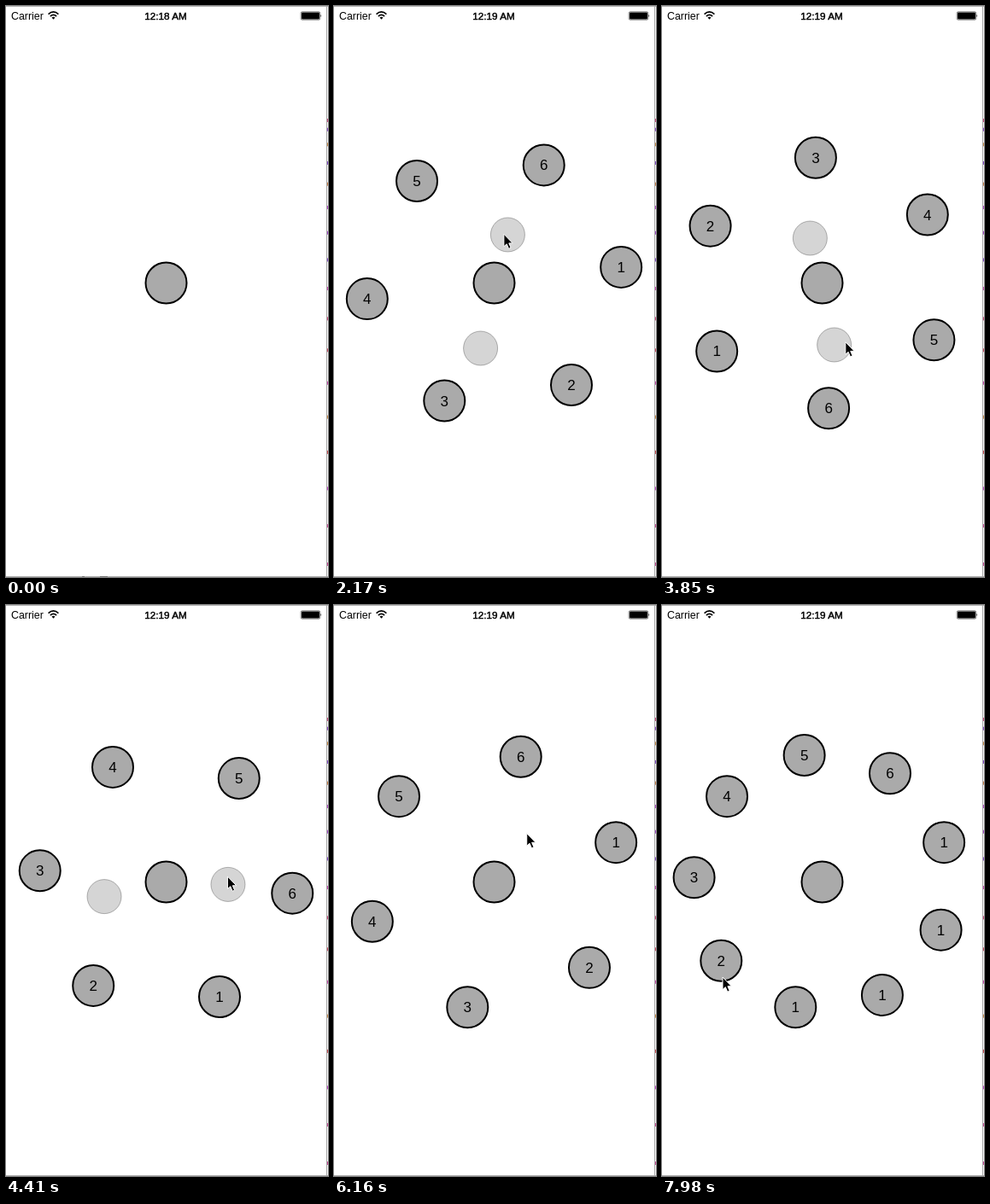
Animation of 377 by 669 pixels, one loop 8 s. Source, as an HTML page:

```html
<!DOCTYPE html>
<html lang="en">
<head>
<meta charset="utf-8">
<title>Radial menu</title>
<style>
  html, body { margin: 0; width: 100%; height: 100%; overflow: hidden; background: #fff; }
  svg { display: block; width: 377px; height: 669px; }
  text { font-family: "Liberation Sans", Arial, sans-serif; }
  .cell circle { fill: #aaa; stroke: #000; stroke-width: 2; }
  .cell text { font-size: 17px; text-anchor: middle; }
  .touch { fill: rgba(128, 128, 128, .33); stroke: rgba(90, 90, 90, .45); }
  #clock { font-size: 11.7px; text-anchor: middle; stroke: #000; stroke-width: .45; }
</style>
</head>
<body>
<svg viewBox="0 0 377 669">
  <rect width="377" height="669" fill="#fff"/>
  <g id="edge">
    <rect width="377" height="1" fill="#b4b4b4"/>
    <rect y="668" width="377" height="1" fill="#b0b0b0"/>
    <rect x="375" width="1" height="669" fill="#a6a6a6"/>
  </g>
  <g id="marks" fill="#777">
    <rect x="89" y="668" width="3" height="1"/>
    <rect x="110" y="668" width="9" height="1"/>
  </g>

  <text x="6" y="15.8" font-size="12.4">Carrier</text>
  <g fill="none" stroke="#000" stroke-width="1.7">
    <path d="M49.6 9.6Q55.5 4.2 61.4 9.6"/>
    <path d="M51.9 12Q55.5 8.8 59.1 12"/>
  </g>
  <path d="M53.5 13.5Q55.5 11.9 57.5 13.5L55.5 15.7Z"/>
  <text id="clock" x="187" y="15.6"></text>
  <rect x="345.2" y="6.8" width="22.6" height="9.4" rx="1.6" fill="none" stroke="#000" stroke-width=".5"/>
  <rect x="346" y="7.6" width="21" height="7.8" rx=".8"/>
  <path d="M368.4 9.8Q370 11.5 368.4 13.2Z"/>

  <g class="cell" transform="translate(187.5 324.5)"><circle r="24"/></g>
  <g id="ring"></g>
  <circle id="touchA" class="touch" r="20"/>
  <circle id="touchB" class="touch" r="20"/>
  <path id="cursor" d="M0 0V14.6L3.3 11.6L5.7 17.2L8.2 16.1L5.9 10.7H10.3Z" stroke="#fff" stroke-linejoin="round"/>
</svg>

<script>
const NS = 'http://www.w3.org/2000/svg';
const LOOP = 8000;
const HUB = [187.5, 324.5], MID = [187.5, 334.5], R = 150;
const OPEN = 800, MOVE = 300;
const INSERTS = [0, 1, 2].map(k => 6406 + 345 * k);
const TOUCH = [1610, 5510], LAG = 70;

// Key points of the drag: time, ring angle, finger angle, finger radius
const DRAG = [
  [1880, 0, -67, 68],
  [2170, -7.1, -76.5, 68.4],
  [3220, -117.1, -182.5, 58],
  [4410, -294.8, -365.5, 72.8],
  [5180, -367.5, -427, 83],
  [5510, -378, -437, 83],
];
// Pointer moves outside the drag: start, duration, end position
const MOVES = [
  [100, 320, [199, 304]],
  [1050, 350, [214, 272]],
  [5510, 1, [206, 253]],
  [5520, 430, [232, 268]],
  [6120, 260, [138, 262]],
  [7450, 300, [71, 318]],
  [7790, 180, [71, 436]],
];

const $ = id => document.getElementById(id);
const rad = deg => deg * Math.PI / 180;
const ease = x => { x = Math.min(1, Math.max(0, x)); return x * x * (3 - 2 * x); };
const mix = (a, b, f) => a.map((v, i) => v + (b[i] - v) * f);
const polar = (o, deg, r) => [o[0] + r * Math.cos(rad(deg)), o[1] + r * Math.sin(rad(deg))];
const place = (el, p) => el.setAttribute('transform', `translate(${p[0].toFixed(2)} ${p[1].toFixed(2)})`);
const show = (el, on) => el.style.display = on ? '' : 'none';

function add(parent, tag, attrs) {
  const el = document.createElementNS(NS, tag);
  for (const k in attrs) el.setAttribute(k, attrs[k]);
  return parent.appendChild(el);
}

// Smooth curve through one column of the drag, without overshoot
function drag(t, c) {
  const last = DRAG.length - 1;
  if (t <= DRAG[0][0]) return DRAG[0][c];
  if (t >= DRAG[last][0]) return DRAG[last][c];
  const slope = i => (DRAG[i + 1][c] - DRAG[i][c]) / (DRAG[i + 1][0] - DRAG[i][0]);
  const tangent = i => {
    if (i === 0 || i === last) return 0;
    const a = slope(i - 1), b = slope(i);
    return a * b <= 0 ? 0 : 2 * a * b / (a + b);
  };
  let i = 0;
  while (t >= DRAG[i + 1][0]) i++;
  const h = DRAG[i + 1][0] - DRAG[i][0], x = (t - DRAG[i][0]) / h, y = 1 - x;
  return DRAG[i][c] + (DRAG[i + 1][c] - DRAG[i][c]) * ease(x)
    + h * x * y * (y * tangent(i) - x * tangent(i + 1));
}

// Specks of the window behind, along the right edge
for (let i = 0; i < 17; i++) {
  const noise = Math.abs(Math.sin(i * 12.9 + 4) * 43758.5) % 1;
  const fill = `hsl(${260 + noise * 140}, 55%, 55%)`;
  add($('edge'), 'rect', { x: 376, y: 132 + 520 * (i / 16) ** 1.4, width: 1, height: 4, fill });
}

// Added cells get negative slots, so each insertion shifts the whole list by one
const cells = [0, 1, 2, 3, 4, 5, -1, -2, -3].map(slot => {
  const el = add($('ring'), 'g', { class: 'cell' });
  add(el, 'circle', { r: 24 });
  add(el, 'text', { y: 6 }).textContent = Math.max(slot, 0) + 1;
  return { slot, el };
});

function drawRing(t) {
  const spin = drag(t, 1);
  // Cells chase the drag along chords, so a fast spin pulls the ring in
  const r = R * Math.cos(rad(spin - drag(t - LAG, 1)));
  const spot = (i, n) => polar(HUB, spin + i * 360 / n, r);
  const begun = INSERTS.filter(s => t >= s).length;
  const f = begun ? ease((t - INSERTS[begun - 1]) / MOVE) : 1;
  const open = ease((t - OPEN) / MOVE);
  const n = 6 + begun;
  for (const { slot, el } of cells) {
    const i = slot + begun;
    show(el, i >= 0 && t > OPEN);
    if (i < 0) continue;
    // Later cells slide within their old index and settle when the move ends
    const from = i ? spot(i - 1, n - 1) : HUB;
    const p = f < 1 ? mix(from, spot(i && Math.max(i - 1, 1), n), f) : spot(i, n);
    place(el, mix(HUB, p, open));
    el.setAttribute('opacity', i ? open : open * f);
  }
}

function drawPointer(t) {
  const down = t >= TOUCH[0] && t < TOUCH[1];
  show($('touchA'), down);
  show($('touchB'), down);
  let p = [236, -18];
  for (const [start, time, to] of MOVES) p = mix(p, to, ease((t - start) / time));
  if (down) {
    const finger = (time, turn = 0) => polar(MID, drag(time, 2) + turn, drag(time, 3));
    place($('touchA'), finger(t));
    place($('touchB'), finger(t, 180));
    p = finger(t + LAG);
  }
  place($('cursor'), p);
}

function draw(t) {
  $('clock').textContent = t < 1800 ? '12:18 AM' : '12:19 AM';
  show($('marks'), t < 560);
  drawRing(t);
  drawPointer(t);
}

const start = performance.now();
function tick() {
  draw((performance.now() - start) % LOOP);
  requestAnimationFrame(tick);
}
tick();
</script>
</body>
</html>
```
